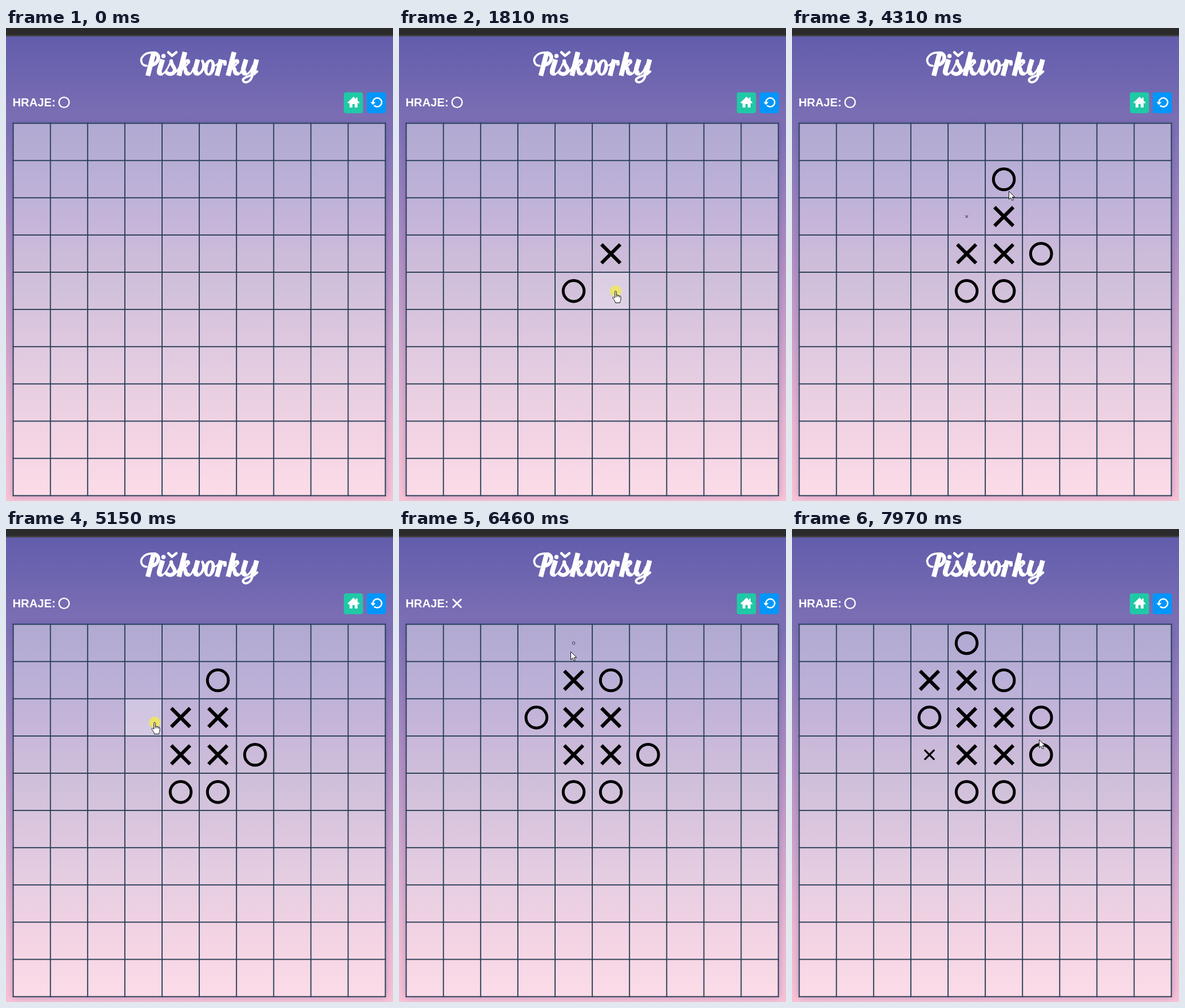
An HTML page with a canvas for the animation above (8000 ms loop, 677x827 px).

```html
<!DOCTYPE html>
<html lang="cs">
<head>
<meta charset="utf-8">
<title>Piškvorky</title>
<style>
  html, body { margin: 0; width: 100%; height: 100%; overflow: hidden; }
  body { position: relative; background: #625dac; }
  canvas { position: absolute; left: 0; top: 0; display: block; }
  h1, p { position: absolute; margin: 0; white-space: nowrap; }
  /* The visible title is drawn as script lettering above this text. */
  h1 { left: 235px; top: 38px; font: italic bold 44px "Noto Serif", serif; color: transparent; }
  p { left: 11.5px; top: 119px; font: bold 20.2px/23px "Liberation Sans", Arial, sans-serif; color: #fff; }
</style>
</head>
<body>
<canvas id="stage" width="677" height="827"></canvas>
<h1>Piškvorky</h1>
<p>HRAJE:</p>
<script>
const W = 677, H = 827, LOOP = 8000, GROW = 150;
// LEFT and TOP are the centres of the first grid lines.
const CELL = 65.1, LEFT = 12.6, TOP = 166.6, SIZE = 10, LINE = 1.9;

// mark, column, row, start time
const moves = [
  ['O', 4, 4, 720], ['X', 5, 3, 1050],
  ['O', 5, 4, 1905], ['X', 4, 3, 2045],
  ['O', 6, 3, 3026], ['X', 5, 2, 3172],
  ['O', 5, 1, 4130], ['X', 4, 2, 4292],
  ['O', 3, 2, 5243], ['X', 4, 1, 5600],
  ['O', 4, 0, 6443], ['X', 3, 1, 6620],
  ['O', 6, 2, 7750], ['X', 3, 3, 7925]
];

// press and release times
const presses = [[650, 720], [1810, 1905], [2900, 3026], [4060, 4130],
  [5130, 5243], [6340, 6443], [7650, 7750]];

// time, x, y
const track = [
  [30, 424, 815], [370, 231, 442], [490, 325, 461],
  [1620, 325, 461], [1780, 379, 460],
  [2670, 379, 460], [2850, 424, 398],
  [3750, 424, 398], [3910, 379, 285],
  [4820, 379, 285], [5100, 260, 338],
  [6000, 260, 338], [6180, 300, 214],
  [6800, 300, 214], [7100, 325, 272],
  [7170, 325, 272], [7450, 447, 335],
  [7790, 447, 335], [7950, 432, 368]
];

const toStrokes = list => list.map(([w, d]) => [w, new Path2D(d)]);

// stroke width, path
const lettering = toStrokes([
  [3.6, 'M246 66C237 66 234 56 239 50C244 43 254 42 262 43.5'],
  [8.5, 'M258.5 43L248 83.5'],
  [6.5, 'M259 44C271 45 268 63 254 64.5'],
  [8.5, 'M274 55L268.5 73C267 79 269 80 273 79'],
  [3, 'M271 81.5C279 80 285 67 289 56'],
  [6.5, 'M289 58C289 66 297 69 295 75C293.5 81 285 82 281 78'],
  [4.5, 'M284 42.5L290.5 48.5L298 42.5'],
  [3, 'M295 78C299 76 301 73 303 69'],
  [8.2, 'M335.5 55L331.5 70C330 78 332 80 337 79'],
  [4.5, 'M336 81C345 77 348 66 343.5 57.5'],
  [3.5, 'M344 58C346 64 349 66 352 64'],
  [3, 'M361 62C365 67 368 66 371 62'],
  [8.5, 'M376.5 55L369 83.5'],
  [4, 'M373 70C375 61 380 56 383 59'],
  [6, 'M383 59L383 63'],
  [8.2, 'M420 55L415.5 70C414 78 416 80 421 79'],
  [3.5, 'M420 81C426 80 430 72 432 66'],
  [8.5, 'M438.5 55L431.5 82'],
  [4, 'M431.5 81C429 96 416 98 414.5 91C414.5 85 433 84 439.5 76']
]);

const letterK = toStrokes([
  [8.5, 'M313 42L302.5 83.5'],
  [3, 'M306 69C313 69 319 63 319 59'],
  [5, 'M312 63C314 56 321 55 319.5 60'],
  [7, 'M309 69C318 70 311 80 318 79.5'],
  [3, 'M317 81.7C322 82 326 77 328 70']
]);

const house = new Path2D(
  'M608 120L597.5 130.3L599 132L601 131V139H606V133H610V139H615V131L617 132L618.5 130.3L615 127V121.5H612.5V124.5Z');
const arrow = new Path2D('M.5 .5V14.5L3.8 11.5L6 16.5L8.3 15.5L6.2 10.7H10.7Z');
const hand = new Path2D(
  'M-1.3 1.2C-1.3 -.3 1.3 -.3 1.3 1.2V7L3 6.8L4 7.6L6 7.5L7 8.5C9 8 9 9.5 9 11V15C9 17 7.5 18 7.5 20.5H-.5C-.5 17.5 -3 15.5 -5 12C-5.5 10.5 -3.5 9.5 -1.3 12Z');
const fingers = new Path2D('M1.3 7V10.5M4 8V10.5M6.7 8.5V11');

const stage = document.getElementById('stage');
const still = document.createElement('canvas');
still.width = W;
still.height = H;

function gradient(c, y0, y1, colors) {
  const g = c.createLinearGradient(0, y0, 0, y1);
  colors.forEach(([y, color]) => g.addColorStop((y - y0) / (y1 - y0), color));
  return g;
}

// Heavy stems end flat, thin strokes end round.
function strokes(c, list, dx = 0) {
  c.save();
  c.translate(dx, 0);
  list.forEach(([w, path]) => {
    c.lineWidth = w;
    c.lineCap = w > 8 ? 'butt' : 'round';
    c.stroke(path);
  });
  c.restore();
}

function drawTitle(c) {
  c.strokeStyle = c.fillStyle = '#fff';
  c.lineJoin = 'round';
  strokes(c, lettering);
  strokes(c, letterK);
  strokes(c, letterK, 86);
  c.beginPath();
  c.arc(275.5, 49, 3.8, 0, 7);
  c.fill();
  c.beginPath();
  c.ellipse(356, 69, 9.5, 14.5, .2, 0, 7);
  c.closePath();
  c.moveTo(359, 69);
  c.ellipse(356, 69, 3, 10.5, .2, 0, 7);
  c.fill('evenodd');
}

function button(c, x, color) {
  c.fillStyle = color;
  c.beginPath();
  c.roundRect(x, 112.5, 33.5, 36.5, 4);
  c.fill();
}

function drawStill() {
  const c = still.getContext('2d');
  c.fillStyle = gradient(c, 15, H, [
    [15, '#625dac'], [90, '#6f66b0'], [166, '#7d6fb4'], [260, '#917cba'],
    [400, '#b18ec1'], [550, '#cfa4c9'], [700, '#ebb7cf'], [H, '#f9c2d5']
  ]);
  c.fillRect(0, 0, W, H);
  c.fillStyle = '#2b2b2b';
  c.fillRect(0, 0, W, 12);
  c.fillStyle = '#404040';
  c.fillRect(0, 12, W, 2.6);

  const side = CELL * SIZE;
  c.save();
  c.shadowColor = 'rgba(50,55,150,.35)';
  c.shadowBlur = 12;
  c.fillStyle = gradient(c, 166, 818, [
    [166, '#b0a9d1'], [265, '#bbb0d7'], [330, '#c4b4d9'], [395, '#ccbbd9'],
    [460, '#d2c1db'], [525, '#dbc6de'], [590, '#e3cce1'], [655, '#ebd0e2'],
    [720, '#f3d4e4'], [818, '#fcdce8']
  ]);
  c.fillRect(LEFT, TOP, side, side);
  c.restore();

  c.fillStyle = '#283f56';
  for (let i = 0; i <= SIZE; i++) {
    const x = LEFT - LINE / 2, y = TOP - LINE / 2, d = i * CELL;
    c.fillRect(x + d, y, LINE, side + LINE);
    c.fillRect(x, y + d, side + LINE, LINE);
  }

  drawTitle(c);
  button(c, 591, '#20c9a6');
  button(c, 631, '#0096fa');
  c.fillStyle = '#fff';
  c.fill(house);
  c.lineCap = 'butt';
  c.lineWidth = 2.6;
  c.beginPath();
  c.arc(649.5, 130, 7.7, Math.PI, Math.PI * 2.76);
  c.stroke();
  c.fill(new Path2D('M637.5 129.5H646.5L642 134.5Z'));
}

function bezier(p, a, b) {
  return 3 * a * p * (1 - p) ** 2 + 3 * b * p * p * (1 - p) + p ** 3;
}

// CSS "ease"
function ease(x) {
  if (x >= 1) return 1;
  let lo = 0, hi = 1;
  for (let i = 0; i < 20; i++) {
    const mid = (lo + hi) / 2;
    if (bezier(mid, .25, .25) < x) lo = mid; else hi = mid;
  }
  return bezier(lo, .1, 1);
}

function pointer(t) {
  const i = track.findIndex(k => k[0] > t);
  if (i < 0) return track[track.length - 1].slice(1);
  const [t0, x0, y0] = track[i - 1], [t1, x1, y1] = track[i];
  const p = (t - t0) / (t1 - t0), s = p * p * (3 - 2 * p);
  return [x0 + (x1 - x0) * s, y0 + (y1 - y0) * s];
}

function drawMark(c, mark, x, y, scale, radius, arm, color, ring, bar) {
  c.save();
  c.translate(x, y);
  c.scale(scale, scale);
  c.strokeStyle = color;
  c.lineWidth = mark === 'O' ? ring : bar;
  c.beginPath();
  if (mark === 'O') {
    c.arc(0, 0, radius, 0, Math.PI * 2);
  } else {
    c.moveTo(-arm, -arm);
    c.lineTo(arm, arm);
    c.moveTo(arm, -arm);
    c.lineTo(-arm, arm);
  }
  c.stroke();
  c.restore();
}

function drawPointer(c, x, y, isHand, pressed) {
  if (pressed) {
    c.fillStyle = 'rgba(240,232,90,.85)';
    c.beginPath();
    c.arc(x, y, 10, 0, 7);
    c.fill();
  }
  c.save();
  c.translate(x, y);
  c.fillStyle = '#fff';
  c.strokeStyle = '#111';
  c.lineWidth = 1;
  c.lineJoin = 'round';
  const shape = isHand ? hand : arrow;
  c.fill(shape);
  c.stroke(shape);
  if (isHand) c.stroke(fingers);
  c.restore();
}

function draw(t) {
  const c = stage.getContext('2d');
  c.drawImage(still, 0, 0);
  const placed = moves.filter(m => m[3] <= t);
  const turn = placed.length % 2 ? 'X' : 'O';
  drawMark(c, turn, 101.6, 130, 1, 8.9, 7.6, '#fff', 2.4, 2.8);

  let spot = null, isHand = false;
  if (t >= track[0][0]) {
    spot = pointer(t);
    const col = Math.floor((spot[0] - LEFT) / CELL);
    const row = Math.floor((spot[1] - TOP) / CELL);
    const inside = col >= 0 && col < SIZE && row >= 0 && row < SIZE;
    isHand = inside && !placed.some(m => m[1] === col && m[2] === row);
    if (isHand) {
      c.fillStyle = 'rgba(255,255,255,.24)';
      c.fillRect(LEFT + col * CELL + LINE / 2, TOP + row * CELL + LINE / 2, CELL - LINE, CELL - LINE);
    }
  }

  placed.forEach(([mark, col, row, start]) => {
    const x = LEFT + (col + .5) * CELL, y = TOP + (row + .5) * CELL + .3;
    drawMark(c, mark, x, y, ease((t - start) / GROW), 18.3, 16.4, '#000', 5, 6.2);
  });

  if (spot) drawPointer(c, ...spot, isHand, presses.some(([a, b]) => t >= a && t < b));
}

drawStill();
const begin = performance.now();
function tick() {
  draw((performance.now() - begin) % LOOP);
  requestAnimationFrame(tick);
}
tick();
</script>
</body>
</html>
```
